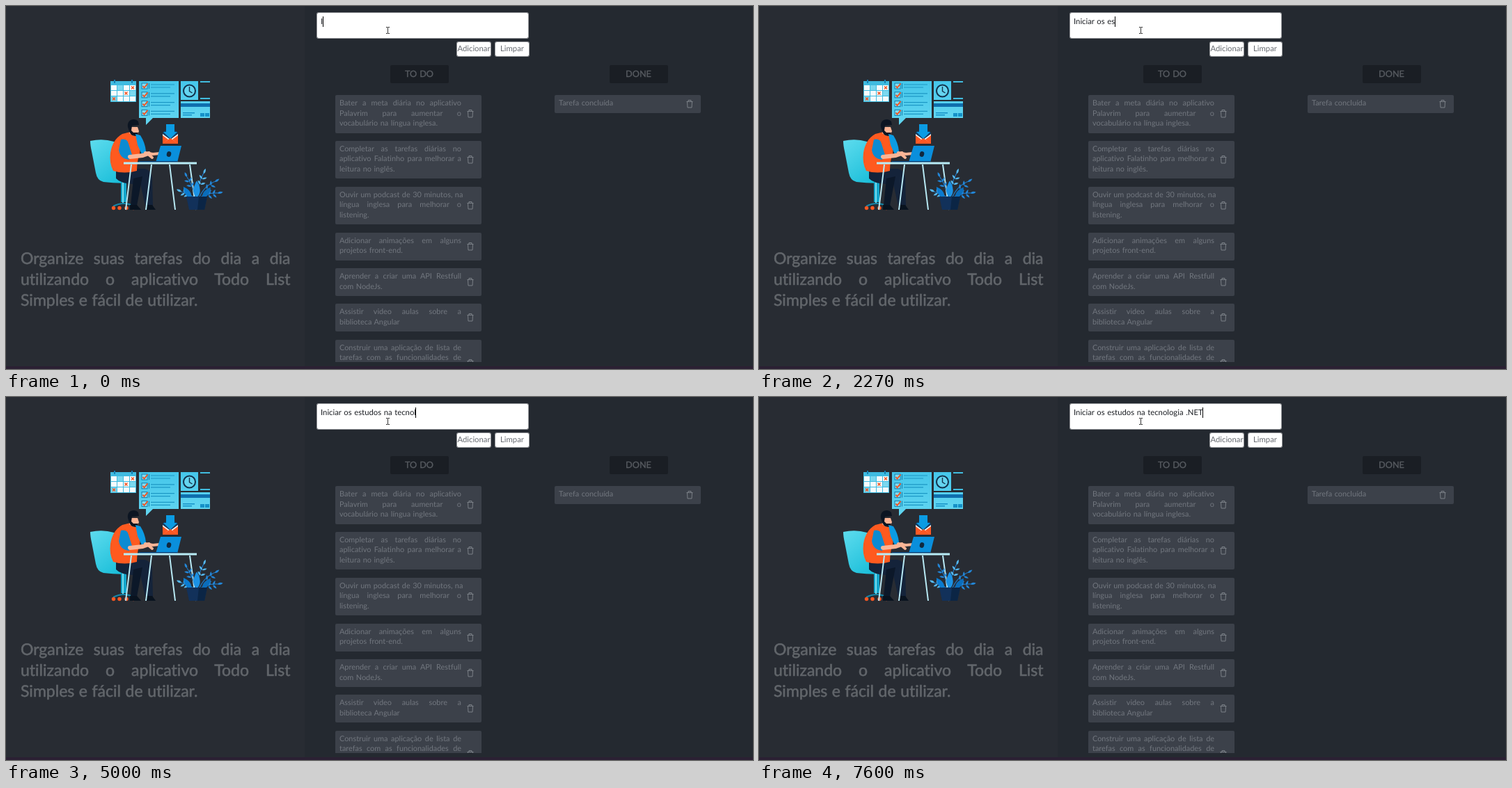
Write an HTML page that moves like this. It is 1073 px wide and 522 px high and loops after 8 s.

```html
<!DOCTYPE html>
<html lang="pt-BR">
<head>
<meta charset="utf-8">
<title>Lista de tarefas</title>
<style>
html, body { margin: 0; width: 100%; height: 100%; overflow: hidden; background: #242930; }
#stage {
  position: relative; width: 1073px; height: 522px; overflow: hidden;
  font: 10.9px/14.5px Lato, "Open Sans", sans-serif; word-spacing: .067em; color: #72777f;
  font-variant-ligatures: none; text-rendering: geometricPrecision;
}
#stage > * { position: absolute; box-sizing: border-box; }
.side { left: 0; top: 0; width: 429px; height: 522px; background: #282c33; }
.strip { left: 0; top: 518px; width: 1073px; height: 4px; background: #2b2033; }
.lead {
  left: 21px; top: 346.5px; width: 387.5px; font-size: 23px; line-height: 30.3px;
  color: #62666b; -webkit-text-stroke: .55px #62666b;
}
.line { white-space: nowrap; text-align-last: justify; }
.line:last-of-type { text-align-last: left; }
.field, .button { background: #fff padding-box; border: 1px solid rgba(255, 255, 255, .5); border-radius: 3px; }
.field { left: 446px; top: 9px; width: 305px; height: 38px; }
.typed { left: 452px; top: 14.5px; font-size: 11.3px; line-height: 15px; white-space: pre; color: #1c1f24; }
#caret { display: inline-block; width: 1px; height: 15px; margin: 0 0 0 -.5px; vertical-align: top; background: #000; }
.button {
  top: 51px; width: 50px; height: 22px; font-size: 11.3px; line-height: 20px;
  text-align: center; white-space: nowrap; color: #666a70;
}
.head {
  top: 85px; width: 84px; height: 26px; background: #1a1e24; border-radius: 2px;
  font-size: 12.7px; line-height: 25px; text-align: center; color: #575b61; -webkit-text-stroke: .35px #575b61;
}
.list { top: 128px; width: 210px; height: 384px; overflow: hidden; }
.card {
  position: relative; width: 210px; margin-bottom: 11.4px; padding: 5px 29px 6px 6px;
  box-sizing: border-box; background: #3c414a; border-radius: 2px;
}
.card svg { position: absolute; left: 189px; top: calc(50% - 6px); }
</style>
</head>
<body>
<div id="stage">
  <div class="side"></div>
  <svg width="429" height="320" style="left:0;top:0">
    <defs>
      <linearGradient id="seat" x2="1" y2="1"><stop stop-color="#5edcee"/><stop offset="1" stop-color="#04b4d2"/></linearGradient>
      <linearGradient id="panel" x2="0" y2="1"><stop stop-color="#45c6ea"/><stop offset="1" stop-color="#62d6f1"/></linearGradient>
    </defs>
    <!-- calendar -->
    <path fill="#3fbbe0" d="M150 108h37v30h-37z"/>
    <path fill="#1680b4" d="M155 106h2v5h-2zM180 106h2v5h-2z"/>
    <g id="days"></g>
    <path stroke="#f4511e" stroke-width="1.4" d="m170.500 123.500 4 4m0-4-4 4M180 115.500l4 4m0-4-4 4M153 131.500l4 4m0-4-4 4"/>
    <!-- checklist -->
    <path fill="url(#panel)" d="M191 108h57v53h-37l-10 10v-10h-10z"/>
    <g id="checks"></g>
    <!-- clock and card -->
    <path fill="url(#panel)" d="M251 108h25v27h-25zM251 137h42v24h-42z"/>
    <path fill="#41bde0" d="M279 108h14v2h-14zM279 132h14v2h-14z"/>
    <path fill="#0f6fae" d="M251 140h42v5h-42z"/>
    <path fill="#1591c8" d="M254 153h17v1.500h-17zM254 156h13v1.500h-13zM279 154h6v5h-6zM286 154h6v5h-6z"/>
    <circle cx="263.500" cy="122" r="8.500" fill="#65d4ef" stroke="#12324d" stroke-width="2"/>
    <path fill="none" stroke="#12324d" stroke-width="1.400" d="M263.500 116v6.500l4 2.500"/>
    <!-- envelope -->
    <path fill="#123c63" d="m225 182 11-8 11 8v16h-22z"/>
    <path fill="#0b9be3" d="M230 170h12v11h4l-10 10-10-10h4z"/>
    <path fill="#f5f5f2" d="m225 184 11 8 11-8v14h-22z"/>
    <path fill="#ff5722" d="m225 186 8 6-8 6zM247 186l-8 6 8 6zM225 198l11-8 11 8z"/>
    <!-- chair -->
    <path fill="url(#seat)" d="M121 194q18-4 34 1 6 3 8 14l6 27q20 1 31 7l-2 9q-26 5-58 1-9-2-11-13l-6-31q-2-9-2-15z"/>
    <path fill="#12a5cb" d="M165 253h8v29h-8z"/>
    <path fill="none" stroke="#1587a9" stroke-width="2" d="M154 288q15-8 30 0"/>
    <path fill="#78dcee" d="M167 253h2v30h-2z"/>
    <g fill="#ff5722"><circle cx="154.500" cy="290.500" r="2.700"/><circle cx="163" cy="290.500" r="2.700"/><circle cx="173" cy="290.500" r="2.700"/><circle cx="183" cy="290.500" r="2.700"/></g>
    <!-- seated figure -->
    <path fill="#14233a" d="M158 234h41q10 2 11 13l1 40h-11l-7-31q-27 1-35-8z"/>
    <path fill="#0c1829" d="m183 248 13-3-8 42h-9z"/>
    <path fill="#09131f" d="M178 286h10l6 7h-16zM200 286h10l5 7h-15z"/>
    <path fill="#ff5a1f" d="M167 184l12-3 9 3q7 14 4 28-4 11-4 25-18 5-34 0-6-12-4-26 3-19 17-27z"/>
    <path fill="#fbb596" d="M178 174h11l2 6-2 5-6 2-6-4z"/>
    <path fill="#0c1522" d="M175 174q-1-7 4-10 7-3 11 2l1 5-10 1-1 7 3 3h7l-2 5q-10 1-12-10z"/>
    <path fill="#0b9be3" d="m186 184 7 2q7 11 8 23l-6 4-6-13z"/>
    <path fill="#0c8bd2" d="M165 192q9-2 11 6l5 16-4 7q-13-1-15-14z"/>
    <path fill="none" stroke="#fbb596" stroke-width="6" stroke-linecap="round" d="M178 217l18-2 9-3"/>
    <path fill="none" stroke="#fbb596" stroke-width="4" stroke-linecap="round" d="m200 211 11 2 10-1M203 212l7 6"/>
    <!-- laptop and desk -->
    <path fill="#0a8fdc" d="M222 201h30l-6 24h-31z"/>
    <path fill="#063f75" d="M191 223h55v2h-55z"/>
    <ellipse cx="234" cy="213" rx="3.200" ry="4" fill="#10283f" transform="rotate(15 234 213)"/>
    <path fill="none" stroke="#b8e9f4" stroke-width="2" d="m180 228-8 65M209 228l-8 65M235 228l8 65M264 228l9 65"/>
    <path fill="#b9edf7" d="M169 224.500h105v3h-105z"/>
    <!-- plant -->
    <path fill="none" stroke="#1e78c4" stroke-width="1.200" d="M273 276q-5-18-13-30M274 276q1-20 10-36M277 276q8-18 24-24M271 276q-9-7-20-9M278 276q9-8 28-7"/>
    <g id="leaves"></g>
    <path fill="#12315a" d="M259 274h30l-4 19h-22z"/>
    <path fill="#0b2545" d="M277 274h12l-4 19h-10z"/>
  </svg>
  <div class="lead" id="lead"></div>
  <div class="field"></div>
  <div class="typed"><span id="text"></span><span id="caret"></span></div>
  <svg width="8" height="12" style="left:544px;top:29px" fill="none" stroke="#333"><path d="M2 1.500h2l.5.5.5-.5h2M2 10.500h2l.5-.5.5.5h2M4.500 2v8"/></svg>
  <div class="button" style="left:647px">Adicionar</div>
  <div class="button" style="left:702px">Limpar</div>
  <div class="head" style="left:551.5px">TO DO</div>
  <div class="head" style="left:866.5px">DONE</div>
  <div class="list" id="todo" style="left:473px"></div>
  <div class="list" id="done" style="left:788px"></div>
  <div class="strip"></div>
</div>
<script>
const el = id => document.getElementById(id);
const lines = text => text.split("|").map(s => `<div class="line">${s}</div>`).join("");
const bin = `<svg width="10" height="12" fill="none" stroke="#7b8087"><path d="M.5 2.500h9M3 2.500v-2h4v2M1.500 2.500l.5 8.500h6l.5-8.500"/></svg>`;
const card = text => `<div class="card">${lines(text)}${bin}</div>`;

el("lead").innerHTML = lines("Organize suas tarefas do dia a dia|utilizando o aplicativo Todo List|Simples e fácil de utilizar.");
el("todo").innerHTML = [
  "Bater a meta diária no aplicativo|Palavrim para aumentar o|vocabulário na língua inglesa.",
  "Completar as tarefas diárias no|aplicativo Falatinho para melhorar a|leitura no inglês.",
  "Ouvir um podcast de 30 minutos, na|língua inglesa para melhorar o|listening.",
  "Adicionar animações em alguns|projetos front-end.",
  "Aprender a criar uma API Restfull|com NodeJs.",
  "Assistir video aulas sobre a|biblioteca Angular",
  "Construir uma aplicação de lista de|tarefas com as funcionalidades de|adicionar, concluir e remover as|tarefas da lista."
].map(card).join("");
el("done").innerHTML = card("Tarefa concluída");

// Repeated parts of the illustration
let days = "", checks = "", leaves = "";
for (let row = 0; row < 3; row++)
  for (let col = 0; col < 4; col++) {
    const fill = (row * 3 + col) % 5 === 1 ? "#7bd8ef" : "#f7fbfc";
    days += `<rect x="${151 + col * 9}" y="${114 + row * 8}" width="8" height="7" fill="${fill}"/>`;
  }
for (let i = 0; i < 4; i++) {
  const y = 111 + i * 12.8;
  checks += `<rect x="195" y="${y}" width="8" height="8" fill="#80def3" stroke="#167ba9"/>
    <path fill="none" stroke="#f4511e" stroke-width="1.8" d="M196.500 ${y + 4}l2 2.500 5-6"/>
    <path stroke="#127fae" d="M205.500 ${y}v8"/>
    <path stroke="#1c98c5" stroke-width="1.2" d="M208 ${y + 2}h34M208 ${y + 6}h28"/>`;
}
const leaf = (x, y, turn, size, fill) =>
  `<path fill="${fill}" transform="translate(${x} ${y}) rotate(${turn}) scale(${size})" d="M0 0q-5-5 0-13 5 8 0 13z"/>`;
const stems = [[260, 246, -25], [284, 241, 20], [300, 253, 55], [252, 267, -65], [304, 269, 80]];
stems.forEach(([x, y, turn], i) => {
  const fill = i % 2 ? "#55b9f0" : "#2387d9";
  leaves += leaf(x, y, turn, .6, fill);
  for (let k = 1; k < 3; k++) {
    const px = x + (274 - x) * k * .22, py = y + (276 - y) * k * .22;
    leaves += leaf(px, py, turn - 55, .55, fill) + leaf(px, py, turn + 55, .55, fill);
  }
});
leaves += leaf(266, 276, -35, 1.5, "#0b7bd0") + leaf(274, 276, 0, 1.9, "#1c92e4") + leaf(282, 276, 38, 1.5, "#0b6dbb");
el("days").innerHTML = days;
el("checks").innerHTML = checks;
el("leaves").innerHTML = leaves;

// Time in ms at which each character appears
const phrase = "Iniciar os estudos na tecnologia .NET";
const keys = [
  0, 270, 470, 730, 800, 1070, 1200, 1670, 1870, 2000, 2070, 2200, 2270,
  2470, 2600, 2800, 2930, 3200, 3530, 3800, 3930, 4070, 4130, 4200, 4470,
  4670, 4870, 5000, 5200, 5330, 5530, 5670, 6130, 6870, 7270, 7470, 7600
];
let shown = -1;
function draw() {
  const t = performance.now() % 8000;
  const count = keys.filter(k => k <= t).length;
  if (count !== shown) el("text").textContent = phrase.slice(0, shown = count);
  el("caret").style.visibility = t >= 6670 && t < 6870 ? "hidden" : "visible";
  requestAnimationFrame(draw);
}
draw();
</script>
</body>
</html>
```
